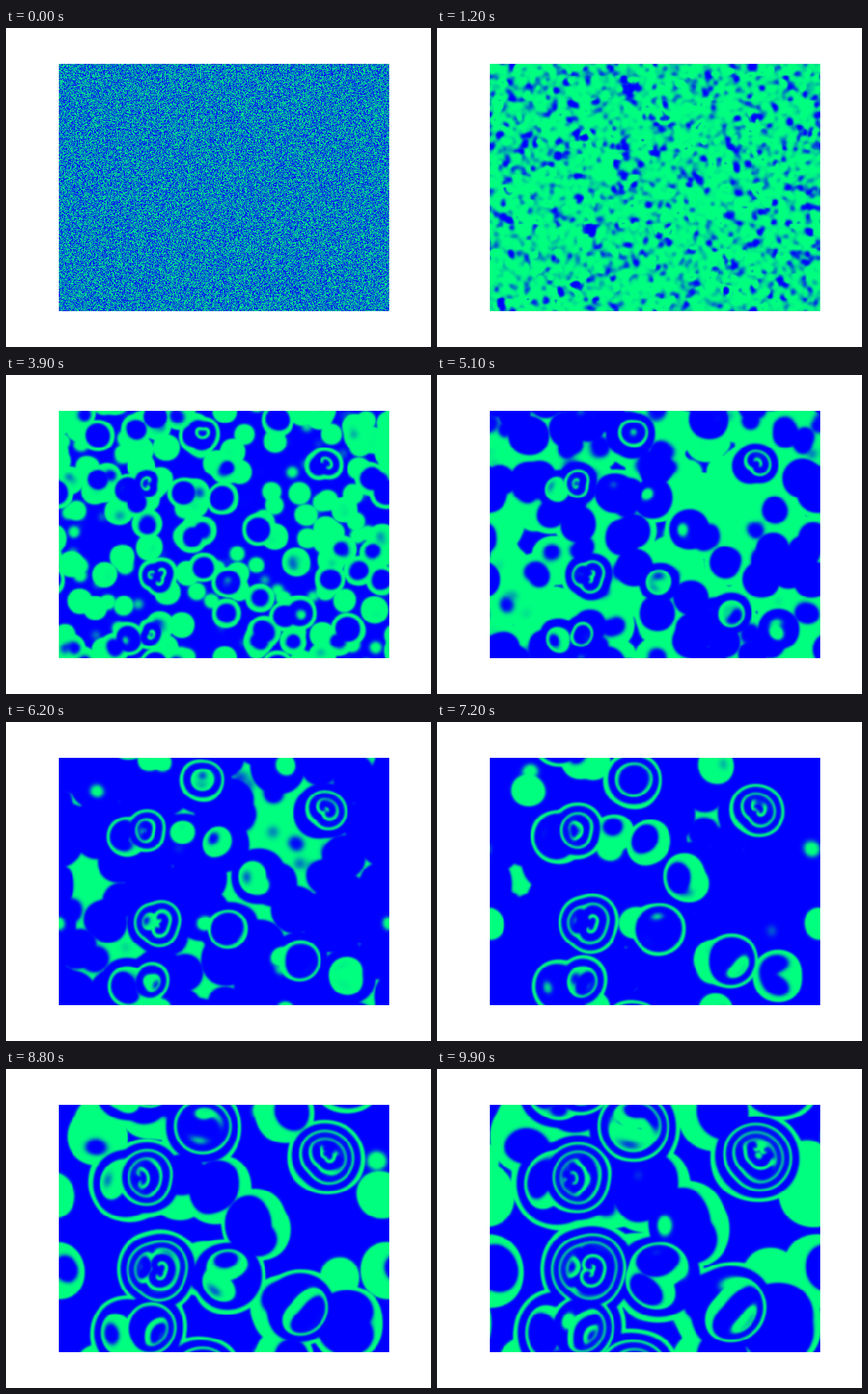
These frames come from a looping animation (499x374 px, 10 s). A matplotlib script:

```python
import numpy as np
import matplotlib.pyplot as plt
from matplotlib.animation import FuncAnimation

# Belousov-Zhabotinsky reaction: three species on a periodic grid.
W, H, DPI = 499, 374, 64
LEFT, TOP, BOX_W, BOX_H = 62, 42, 388, 290
NX, NY = 400, 300
FRAMES, INTERVAL = 100, 100
ALPHA, BETA, GAMMA = 1.2, 1.0, 1.0

# Stage positions where the main spirals form.
SPIRALS = [(171, 130), (371, 106), (230, 70), (177, 235), (162, 300), (338, 306)]


def blur(a):
    """Mean over the 3x3 neighbourhood with wrapped edges."""
    for axis in (-1, -2):
        a = (a + np.roll(a, 1, axis) + np.roll(a, -1, axis)) / 3
    return a


def bump(n, centre, sigma=4.5):
    d = (np.arange(n) - centre + n / 2) % n - n / 2
    return np.exp(-d**2 / (2 * sigma**2))


def start():
    """White noise, slightly calmed at large scales, nudged at the spirals."""
    noise = np.random.default_rng(7).random((3, NY, NX))
    smooth = noise
    for _ in range(12):
        smooth = blur(smooth)
    state = noise - 0.1 * (smooth - 0.5)
    shift = np.array([-0.05, -0.05, 0.2])[:, None, None]
    for px, py in SPIRALS:
        x = (px - LEFT) * NX / BOX_W
        y = (py - TOP) * NY / BOX_H
        state = state + shift * np.outer(bump(NY, y), bump(NX, x))
    return np.clip(state, 0, 1)


def react(state):
    a, b, c = blur(state)
    return np.clip([
        a * (1 + ALPHA * b - GAMMA * c),
        b * (1 + BETA * c - ALPHA * a),
        c * (1 + GAMMA * a - BETA * b),
    ], 0, 1)


def simulate():
    state = start()
    shots = np.empty((FRAMES, NY, NX))
    for i in range(FRAMES):
        shots[i] = state[0]
        state = react(state)
    return shots


shots = simulate()

fig = plt.figure(figsize=(W / DPI, H / DPI), dpi=DPI, facecolor="white")
ax = fig.add_axes([LEFT / W, 1 - (TOP + BOX_H) / H, BOX_W / W, BOX_H / H])
ax.axis("off")
im = ax.imshow(shots[0], cmap="winter", vmin=0, vmax=1,
               interpolation="nearest", aspect="auto")


def draw(i):
    im.set_data(shots[i])
    return [im]


anim = FuncAnimation(fig, draw, frames=FRAMES, interval=INTERVAL, repeat=True)
plt.show()
```
